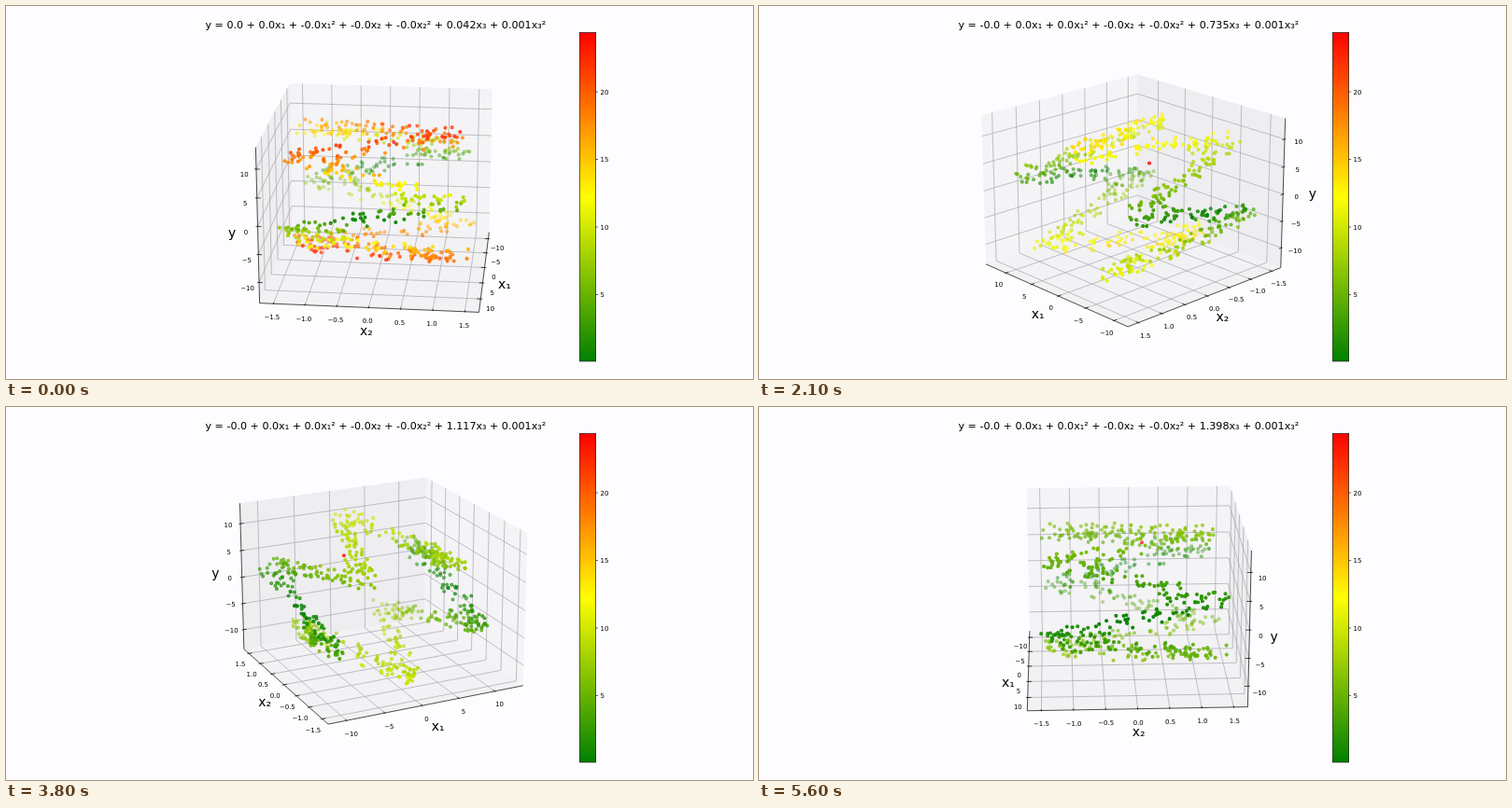
Recreate the animation shown at these times as an HTML page with a canvas. Size 800 by 400 pixels, loop 5700 ms.

```html
<!DOCTYPE html>
<html lang="en">
<head>
<meta charset="utf-8">
<title>Regression fit in 3D</title>
<style>
  html, body { margin: 0; width: 100%; height: 100%; overflow: hidden; background: #fdfcff; }
  canvas { display: block; }
</style>
</head>
<body>
<canvas id="stage" width="800" height="400"></canvas>
<script>
const ctx = document.getElementById('stage').getContext('2d');
const STEP = 100, STEPS = 57, TAU = 2 * Math.PI;
const MAX_ERROR = 24.4;
const INK = '#000', GRID = '#a8a7aa';

// step, camera azimuth in degrees, learned weight of x3
const KEYS = [
  [0, 5.9, 0.042], [9, 60.9, 0.38], [16, 105.6, 0.607], [26, 168, 0.863],
  [38, 244, 1.117], [46, 294.6, 1.267], [56, 357.5, 1.398]
];

// Box geometry, one entry per axis: x1, x2, y
const HALF = [0.5714, 0.5714, 0.4286];
const MID = [0.8, 0, 0];
const RANGE = [12.67, 1.65, 13.2];
const PANE = HALF.map(h => h * 25 / 24);
const PANE_FILL = ['#f4f3f6', '#eeedf0', '#f2f1f4'];
const TICKS = [
  [-10, -5, 0, 5, 10],
  [-1.5, -1, -0.5, 0, 0.5, 1, 1.5],
  [-10, -5, 0, 5, 10]
];
const NAMES = ['x₁', 'x₂', 'y'];

const CENTER = { x: 400.5, y: 200 }, ZOOM = 1905, DIST = 10;
const ELEV = 20 * Math.PI / 180, SE = Math.sin(ELEV), CE = Math.cos(ELEV);
let sa = 0, ca = 1;

function random(seed) {
  return () => {
    seed = (seed + 0x6D2B79F5) | 0;
    let t = Math.imul(seed ^ (seed >>> 15), 1 | seed);
    t = (t + Math.imul(t ^ (t >>> 7), 61 | t)) ^ t;
    return ((t ^ (t >>> 14)) >>> 0) / 4294967296;
  };
}

const scale = (v, i) => (v - MID[i]) / RANGE[i] * HALF[i];

// A ring in x1 and y that waves five times along x2
const rnd = random(11);
const points = Array.from({ length: 720 }, () => {
  const angle = rnd() * TAU;
  const radius = 9 + 2.5 * rnd();
  const x2 = Math.sin(5 * angle) + rnd() - 0.5;
  return makePoint(radius * Math.cos(angle), x2, radius * Math.sin(angle));
});
points.push({ ...makePoint(-3.5, 0.17, 7.3), outlier: true });

function makePoint(x1, x2, y) {
  return { x1, y, pos: [x1, x2, y].map(scale) };
}

function project([x, y, z]) {
  const toward = ca * x + sa * y;
  const depth = CE * toward + SE * z;
  const k = ZOOM / (DIST - depth);
  return {
    x: CENTER.x + k * (ca * y - sa * x),
    y: CENTER.y - k * (CE * z - SE * toward),
    depth
  };
}

function trace(list) {
  ctx.beginPath();
  list.map(project).forEach(p => ctx.lineTo(p.x, p.y));
}

function line(list, color) {
  trace(list);
  ctx.strokeStyle = color;
  ctx.lineWidth = 0.7;
  ctx.stroke();
}

function text(str, x, y, size, align = 'center') {
  ctx.font = `${size}px "DejaVu Sans", sans-serif`;
  ctx.textAlign = align;
  ctx.fillStyle = INK;
  ctx.fillText(str, x, y);
}

function errorColor(error) {
  const v = Math.min(1, error / MAX_ERROR);
  return v < 0.5
    ? `rgb(${510 * v}, ${128 + 254 * v}, 0)`
    : `rgb(255, ${510 * (1 - v)}, 0)`;
}

// Point in the box: value on axis i, pane signs on the others, pushed out by pad
function onEdge(i, value, signs, pad = 0) {
  return signs.map((s, j) => j === i ? value : s * PANE[j] * (1 + pad / 6));
}

function drawBox() {
  const fx = Math.sign(ca) || 1, fy = Math.sign(sa) || 1;
  const back = [-fx, -fy, -1];
  const edges = [[0, fy, -1], [fx, 0, -1], [fx, -fy, 0]];
  const flip = (signs, j) => signs.map((s, n) => n === j ? -s : s);

  for (let i = 0; i < 3; i++) {
    const j = (i + 1) % 3, k = (i + 2) % 3;
    const corners = [back, flip(back, j), flip(flip(back, j), k), flip(back, k)];
    trace(corners.map(c => c.map((s, n) => s * PANE[n])));
    ctx.fillStyle = PANE_FILL[i];
    ctx.fill();
  }

  for (let i = 0; i < 3; i++) {
    const j = (i + 1) % 3, k = (i + 2) % 3;
    for (const tick of TICKS[i]) {
      const v = scale(tick, i);
      line([flip(back, j), back, flip(back, k)].map(s => onEdge(i, v, s)), GRID);
    }
  }

  for (let i = 0; i < 3; i++) {
    const edge = edges[i];
    line([-PANE[i], PANE[i]].map(v => onEdge(i, v, edge)), INK);
    const dir = i < 2 ? 1 - i : Math.abs(ca) > 0.7 ? 1 : 0;
    for (const tick of TICKS[i]) {
      const v = scale(tick, i);
      const base = onEdge(i, v, edge);
      line([-0.2, 0.1].map(d =>
        base.map((c, n) => n === dir ? c * (1 + d / 6) : c)), INK);
      const p = project(onEdge(i, v, edge, 0.544));
      const label = (i === 1 ? tick.toFixed(1) : String(tick)).replace('-', '−');
      text(label, p.x, p.y + 5.2, 6.94);
    }
    const p = project(onEdge(i, 0, edge, 1.182));
    text(NAMES[i], p.x, p.y + 4, 13.9);
  }
}

function drawPoints(weight, skew) {
  const dots = points.map(p => ({ ...project(p.pos), p }));
  dots.sort((a, b) => a.depth - b.depth);
  const near = dots[dots.length - 1].depth, far = dots[0].depth;
  ctx.lineWidth = 1.04;
  for (const { x, y, depth, p } of dots) {
    const error = p.outlier ? MAX_ERROR
      : Math.abs((2 - weight) * p.y * (1 + skew * p.x1 / 10) - 0.001 * p.y * p.y);
    ctx.fillStyle = ctx.strokeStyle = errorColor(error);
    ctx.globalAlpha = 0.3 + 0.7 * (depth - far) / (near - far);
    ctx.beginPath();
    ctx.arc(x, y, 1.55, 0, TAU);
    ctx.fill();
    ctx.stroke();
  }
  ctx.globalAlpha = 1;
}

function drawColorbar() {
  const x = 614.3, top = 28.5, w = 17.4, h = 352.5;
  const fill = ctx.createLinearGradient(0, top, 0, top + h);
  fill.addColorStop(0, '#f00');
  fill.addColorStop(0.5, '#ff0');
  fill.addColorStop(1, '#008000');
  ctx.fillStyle = fill;
  ctx.fillRect(x, top, w, h);
  ctx.strokeStyle = INK;
  ctx.lineWidth = 0.6;
  ctx.strokeRect(x, top, w, h);
  for (let v = 5; v <= 20; v += 5) {
    const y = 382 - 14.5 * v;
    ctx.beginPath();
    ctx.moveTo(x + w, y);
    ctx.lineTo(x + w + 2.4, y);
    ctx.stroke();
    text(v, 636.5, y + 2.6, 6.94, 'left');
  }
}

function keyed(step) {
  const i = Math.max(1, KEYS.findIndex(k => k[0] >= step));
  const a = KEYS[i - 1], b = KEYS[i];
  const u = (step - a[0]) / (b[0] - a[0]);
  return [1, 2].map(n => a[n] + (b[n] - a[n]) * u);
}

function draw() {
  const step = Math.floor(performance.now() / STEP) % STEPS;
  const [azimuth, weight] = keyed(step);
  sa = Math.sin(azimuth * Math.PI / 180);
  ca = Math.cos(azimuth * Math.PI / 180);

  ctx.fillStyle = '#fdfcff';
  ctx.fillRect(0, 0, 800, 400);
  drawBox();
  drawPoints(weight, 0.2 - 0.005 * step);
  drawColorbar();

  const [bias, square] = step ? ['-0.0', '0.0'] : ['0.0', '-0.0'];
  const w3 = Number(weight.toFixed(3));
  text(`y = ${bias} + 0.0x₁ + ${square}x₁² + -0.0x₂ + -0.0x₂² + ${w3}x₃ + 0.001x₃²`,
    395.8, 24, 11.11);
  requestAnimationFrame(draw);
}
draw();
</script>
</body>
</html>
```
